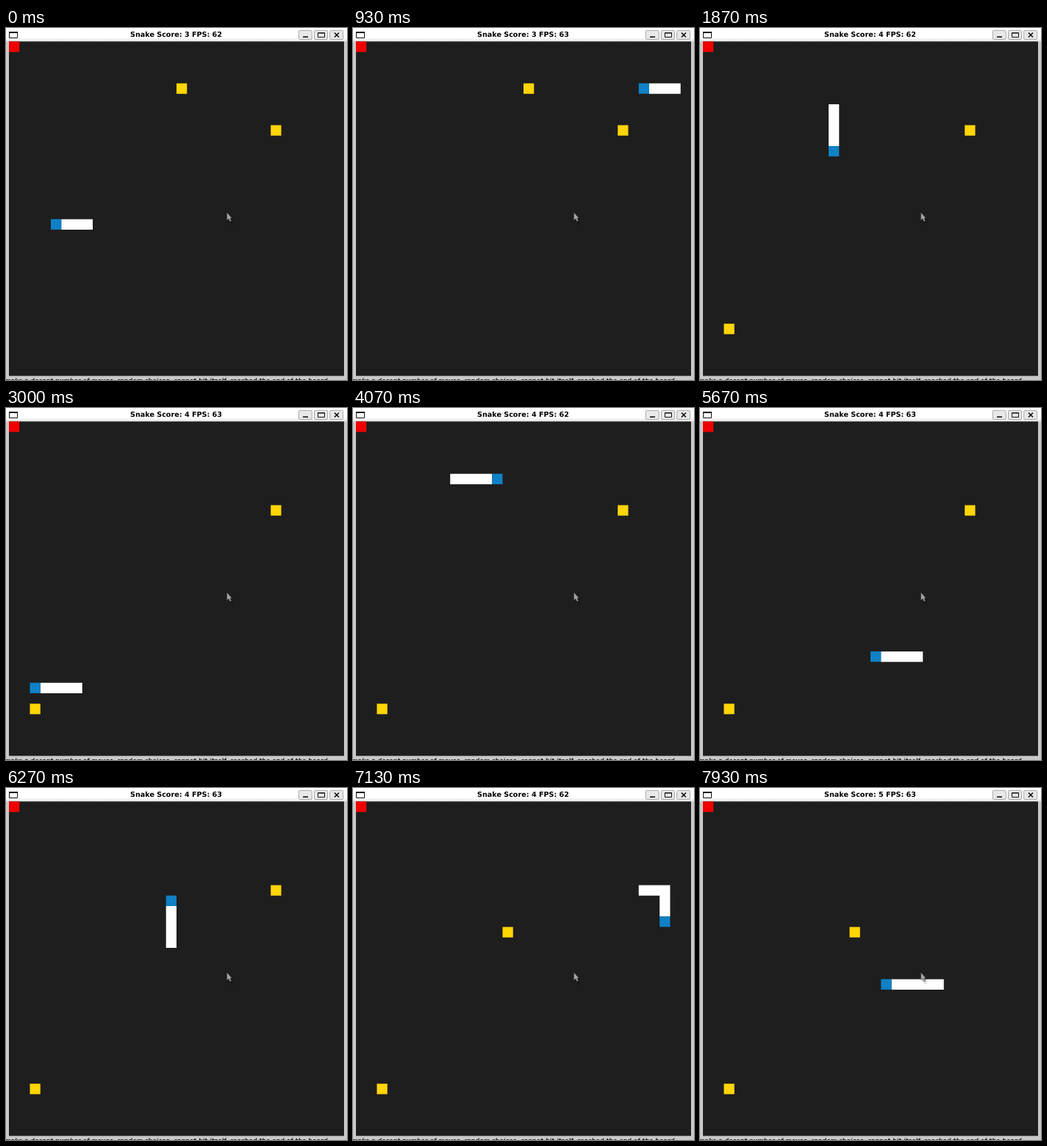
Write an HTML page that moves like this. It is 464 px wide and 480 px high and loops after 8 s.

```html
<!DOCTYPE html>
<html lang="en">
<head>
<meta charset="utf-8">
<title>Snake</title>
<style>
  html, body { margin: 0; width: 100%; height: 100%; overflow: hidden; background: #c9c9c9; }
  svg { display: block; width: 100%; height: 100%; }
  .title { font: bold 9.6px "DejaVu Sans", sans-serif; fill: #000; white-space: pre; text-rendering: geometricPrecision; }
  .behind { font: italic bold 8px "DejaVu Sans", sans-serif; fill: #222; }
  .button { fill: #e8e8e8; stroke: #a9a9a9; }
  .icon { fill: none; stroke: #111; }
</style>
</head>
<body>
<svg viewBox="0 0 464 480">
  <defs>
    <linearGradient id="bar" x2="0" y2="1">
      <stop offset=".7" stop-color="#fff"/>
      <stop offset="1" stop-color="#e2e2e2"/>
    </linearGradient>
    <filter id="soft"><feGaussianBlur stdDeviation=".8"/></filter>
  </defs>

  <rect width="464" height="480" fill="#c9c9c9"/>
  <text class="behind" x="-2" y="483.5">make a decent number of moves, random choices, cannot hit itself, reached the end of the board</text>
  <rect y="470" width="464" height="7.5" fill="#c9c9c9"/>
  <rect width="464" height="18.5" fill="url(#bar)"/>
  <rect x="4" y="18.4" width="456" height="456" fill="#1e1e1e"/>

  <path class="icon" d="M4.5 5.5h11v8h-11z"/>
  <path class="icon" stroke-width="2" d="M4 6h12"/>
  <text class="title" id="title" x="169.1" y="12"></text>

  <rect class="button" x="398.3" y="3.3" width="18" height="12.2" rx="1.5"/>
  <rect class="button" x="419.5" y="3.3" width="18" height="12.2" rx="1.5"/>
  <rect class="button" x="440.7" y="3.3" width="18" height="12.2" rx="1.5"/>
  <path class="icon" stroke-width="1.6" d="M404 12.2h7"/>
  <path class="icon" d="M424.5 6.5h9v6h-9zM424 7h10"/>
  <path class="icon" stroke-width="1.7" d="M447 6.5l6 6m0-6l-6 6"/>

  <path id="red" fill="#f00000"/>
  <path id="food" fill="#ffd506"/>
  <path id="body" fill="#fff"/>
  <path id="head" fill="#1081c6"/>

  <path d="M302.5 255v10l2-2 2 4 2-1-2-4h3z" fill="#000" opacity=".3" filter="url(#soft)"/>
  <path d="M300.7 251.8v10.2l2.2-2 1.9 3.8 1.8-.9-1.8-3.7h2.5z" fill="#a6a6a6" stroke="#444" stroke-width=".4"/>
</svg>
<script>
const LOOP = 8000, FPS = 15, GRID = 32, CELL = 14.25, LEFT = 4, TOP = 18.4;
const LEAD = 3; // cells already behind the head at the start

const route = 'L9 U13 L18 D21 L11 D12 R23 D17 L9 U14 R14 D9 L12';
const direction = { L: [-1, 0], R: [1, 0], U: [0, -1], D: [0, 1] };

// [tick, cells travelled]
const pace = [[0, 0], [28, 43], [39, 60], [45, 68], [61, 93], [65, 99], [76, 115],
  [78, 118], [91, 138], [94, 143], [104, 157], [117, 176], [119, 179]];

// first tick of each window title
const titles = [[0, 3, 62], [13, 3, 63], [25, 4, 62], [37, 4, 63], [61, 4, 62],
  [73, 4, 63], [97, 4, 62], [109, 5, 63]];

const meals = [33, 154];

const wrap = n => (n + GRID) % GRID;
const trail = [[7, 17]];
for (const leg of route.split(' ')) {
  const [dx, dy] = direction[leg[0]];
  for (let n = +leg.slice(1); n > 0; n--) {
    const [x, y] = trail[trail.length - 1];
    trail.push([wrap(x + dx), wrap(y + dy)]);
  }
}

function travelled(tick) {
  const i = Math.max(1, pace.findIndex(p => p[0] >= tick));
  const [t0, s0] = pace[i - 1], [t1, s1] = pace[i];
  return Math.round(s0 + (s1 - s0) * (tick - t0) / (t1 - t0));
}

const square = ([col, row]) =>
  `M${LEFT + col * CELL} ${TOP + row * CELL}h${CELL}v${CELL}h${-CELL}z`;

const el = id => document.getElementById(id);
const draw = (id, cells) => el(id).setAttribute('d', cells.map(square).join(''));

function render(time) {
  const shown = Math.floor(time / 10) * 10;
  const tick = Math.min(119, Math.floor((shown + 3.4) * FPS / 1000));
  const step = travelled(tick);
  const eaten = meals.filter(s => step >= s).length;
  const tip = step + LEAD;

  draw('body', trail.slice(tip - LEAD - eaten, tip));
  draw('head', [trail[tip]]);
  draw('food', [eaten > 0 ? [2, 27] : [16, 4], eaten > 1 ? [14, 12] : [25, 8]]);

  const [, score, fps] = titles.filter(t => t[0] <= tick).pop();
  el('title').textContent = `Snake Score: ${score} FPS: ${fps}`;
}

draw('red', [[0, 0]]);
const start = performance.now();
function frame() {
  render((performance.now() - start) % LOOP);
  requestAnimationFrame(frame);
}
frame();
</script>
</body>
</html>
```
